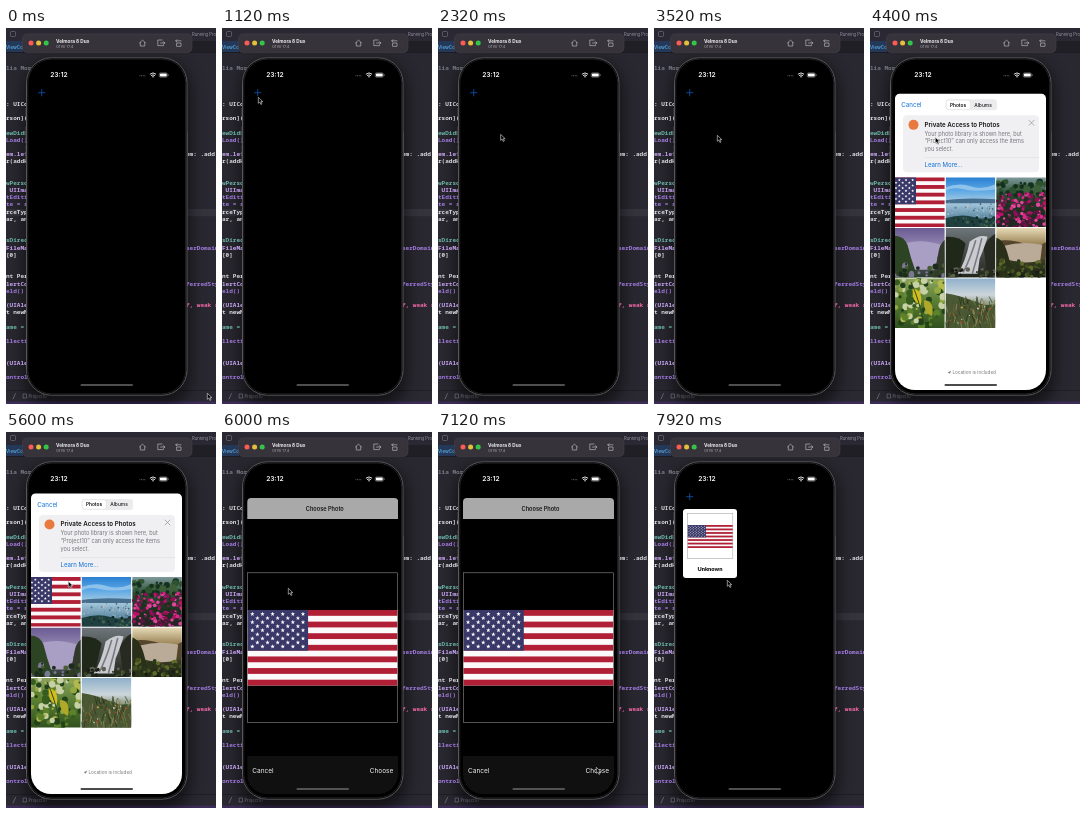
Animation of 210x376 px, one loop 8000 ms. Source, as an HTML page:

```html
<!DOCTYPE html>
<html lang="en">
<head>
<meta charset="utf-8">
<title>Photo picker demo</title>
<style>
html, body { margin: 0; width: 100%; height: 100%; overflow: hidden; background: #24222b; }
svg { display: block; width: 100vw; height: 100vh; }
text { font-family: Inter, Roboto, sans-serif; white-space: pre; }
.code text { font: 600 6px "Noto Sans Mono", "DejaVu Sans Mono", monospace; }
.shadow { filter: blur(8px); opacity: .55; }
</style>
</head>
<body>
<svg id="stage" viewBox="0 0 210 376" xmlns="http://www.w3.org/2000/svg"></svg>
<script>
const LOOP = 8000, STEP = 80;
const stage = document.getElementById('stage');

let seed = 7;
const rnd = (a = 0, b = 1) => {
  seed = (seed * 16807) % 2147483647;
  return a + (b - a) * seed / 2147483647;
};
const pick = list => list[Math.floor(rnd(0, list.length))];
const rect = (x, y, w, h, fill, r = 0, more = '') =>
  `<rect x="${x}" y="${y}" width="${w}" height="${h}" rx="${r}" fill="${fill}" ${more}/>`;
const dot = (x, y, r, fill) => `<circle cx="${x}" cy="${y}" r="${r}" fill="${fill}"/>`;
const path = (d, fill) => `<path d="${d}" fill="${fill}"/>`;
const line = (d, color, w = 0.8) =>
  `<path d="${d}" fill="none" stroke="${color}" stroke-width="${w}" stroke-linecap="round" stroke-linejoin="round"/>`;
const text = (x, y, s, size, fill, weight = 400, anchor = 'start') =>
  `<text x="${x}" y="${y}" font-size="${size}" font-weight="${weight}" fill="${fill}" text-anchor="${anchor}">${s}</text>`;
const group = (id, body, more = '') => `<g id="${id}" ${more}>${body}</g>`;

// ---- editor window ----
const W = '#dcdae0', PINK = '#f267a8', TYPE = '#c9a6f5', FN = '#a27ae0', GREEN = '#6bb5a8', GREY = '#747983';
const leftCode = [
  [42, 'lia Mord', GREY], [78, ': UIColle', W], [92, 'rson]()', W], [107, 'ewDidLoad', GREEN],
  [114, 'Load()', FN], [128, 'em.leftB', TYPE], [135, 'r(addPer', W], [157, 'wPerson', GREEN],
  [164, ' UIImage', TYPE], [171, 'tEditing', FN], [178, 'te = sel', FN], [186, 'rceType', W],
  [193, 'ar, anim', W], [214, 'sDirect', GREEN], [222, 'FileMan', TYPE], [229, '[0]', W],
  [250, 'nt Pers', W], [258, 'lertCon', TYPE], [265, 'eld()', FN], [279, '(UIAlert', TYPE],
  [286, 't newNam', W], [301, 'ame = n', GREEN], [315, 'llection', FN], [337, '(UIAlert', TYPE],
  [351, 'ontroll', FN]
];
const rightCode = [[128, 'em: .add,', W], [222, 'serDomain', FN], [258, 'ferredSty', FN], [279, 'f, weak s', PINK]];

function editor() {
  let s = rect(0, 0, 210, 376, '#292830') + rect(0, 0, 210, 13, '#2a2832') + rect(0, 13, 210, 11, '#201f26')
    + rect(0, 13, 17, 11, '#24385a') + rect(0, 24, 210, 0.6, '#17151c') + rect(0, 181, 210, 7.2, '#35343d');
  s += rect(4.5, 3.5, 5, 5, 'none', 1, 'stroke="#7d7a88" stroke-width=".6"');
  s += text(186, 8, 'Running Project', 4.2, '#9a97a4') + text(0, 20.5, 'ViewCon', 4.6, '#5fb3e6', 500);
  s += rect(0, 362, 210, 11.5, '#2a2831') + rect(0, 362, 210, 0.5, '#17151c') + rect(0, 373.5, 210, 2.5, '#3b2c58');
  s += line('M7 371L9.5 365.500M17.500 366h3v4h-3z', '#8d899b', 0.6) + text(22.5, 370, 'Project10', 4.2, '#9a97a4');
  s += rect(18, 34, 166, 344, '#000', 26, 'class="shadow"');
  const code = leftCode.map(([y, t, c]) => text(0, y, t, 6, c))
    .concat(rightCode.map(([y, t, c]) => text(180, y, t, 6, c))).join('');
  return s + `<g class="code">${code}</g>`;
}

function toolbar() {
  let s = rect(16.5, 6, 169.5, 18.5, '#37333b', 4.5, 'stroke="#48444d" stroke-width=".5"');
  ['#fc5b57', '#e5bf3c', '#35c649'].forEach((c, i) => s += dot(25 + i * 7.6, 15, 2.5, c));
  s += text(50, 15.3, 'Velmora 8 Duo', 4.7, '#f1eff3', 700) + text(50, 20.3, 'Orvo 17.4', 4, '#a5a1a9');
  s += line('M133.500 15L136.500 12L139.500 15M134.300 14.500V18H138.700V14.500', '#c9c6cd', 0.6);
  s += line('M156 12H151.800V17.600H157.500M154.500 15H158.800M157.300 13.500L158.800 15L157.300 16.500', '#c9c6cd', 0.6);
  s += line('M175 12.800H169.800M171 11.600L169.800 12.800L171 14M171 15H175V18.300H171Z', '#c9c6cd', 0.6);
  return s;
}

// ---- pictures ----
function star(x, y, r) {
  let d = '';
  for (let i = 0; i < 10; i++) {
    const a = i * Math.PI / 5, k = i % 2 ? r * 0.4 : r;
    d += (i ? 'L' : 'M') + (x + k * Math.sin(a)).toFixed(2) + ' ' + (y - k * Math.cos(a)).toFixed(2);
  }
  return d + 'Z';
}
function flag(x, y, w, h) {
  const bar = h / 13, cw = w * 0.404, ch = bar * 7;
  let s = rect(x, y, w, h, '#fbf9fa'), d = '';
  for (let i = 0; i < 13; i += 2) s += rect(x, y + i * bar, w, bar, '#b01f36');
  s += rect(x, y, cw, ch, '#393868');
  for (let r = 0; r < 9; r++)
    for (let c = r % 2; c < 11; c += 2) d += star(x + cw * (c + 1) / 12, y + ch * (r + 1) / 10, bar * 0.4);
  return s + path(d, '#fff');
}
const blobs = (n, x0, x1, y0, y1, r0, r1, colors) => {
  let s = '';
  while (n--) s += dot(rnd(x0, x1).toFixed(1), rnd(y0, y1).toFixed(1), rnd(r0, r1).toFixed(1), pick(colors));
  return s;
};
const blades = (n, y0, y1, colors) => {
  let s = '';
  while (n--) {
    const x = rnd(0, 50), y = rnd(y0, y1);
    s += line(`M${x.toFixed(1)} ${y.toFixed(1)}l${rnd(-3, 3).toFixed(1)} ${rnd(-9, -3).toFixed(1)}`, pick(colors), 0.7);
  }
  return s;
};
let defs = '';
const sky = (id, ...colors) => {
  defs += `<linearGradient id="${id}" x2="0" y2="1">` + colors.map((c, i) =>
    `<stop offset="${i / (colors.length - 1)}" stop-color="${c}"/>`).join('') + '</linearGradient>';
  return rect(0, 0, 50, 50, `url(#${id})`);
};
const pictures = [
  () => flag(-19, 0, 99, 50),
  () => sky('p1', '#2a7fd0', '#58a6e6', '#a9cbe0', '#6c96ae', '#3f6f88')
    + path('M0 10Q14 5 25 9T50 7V12Q30 15 18 12T0 14Z', '#8fc2ea')
    + path('M0 23Q20 20 50 22V26H0Z', '#466e8c')
    + blobs(50, 0, 50, 26, 40, 0.4, 1.1, ['#8fb0c0', '#3f6478', '#b4c4c8', '#547f92'])
    + path('M0 41Q16 36 29 40T50 39V50H0Z', '#20403f')
    + blobs(45, 0, 50, 40, 50, 0.5, 1.6, ['#2a4c42', '#142b30', '#47644f']),
  () => sky('p2', '#7e9a9c', '#2b4a30', '#1d3020', '#2a2026')
    + blobs(40, 0, 50, 4, 18, 1, 4, ['#15301e', '#2c5230', '#3c5f38'])
    + blobs(190, 0, 50, 16, 50, 0.7, 2.2, ['#bb0f68', '#d42a88', '#8d1058', '#e0489c', '#1d3020', '#5e1440']),
  () => sky('p3', '#6a5a92', '#8f82ae', '#56566a', '#2a3a28')
    + path('M0 8Q9 8 13 18L18 34L22 50H0Z', '#2d4424')
    + path('M12 15Q28 11 46 17L42 30L44 42H20L16 30Z', '#a99fc4')
    + path('M50 12Q44 16 43 28L38 50H50Z', '#33382c')
    + blobs(34, 0, 50, 36, 50, 1, 3, ['#2e4424', '#1c2c1a', '#495c32', '#7a7890']),
  () => sky('p4', '#6e767c', '#474b46', '#1f261c')
    + path('M0 9Q14 8 20 16L12 50H0Z', '#20281a') + path('M50 6Q42 10 38 20L42 50H50Z', '#262a20')
    + path('M24 14Q34 6 42 9Q38 22 34 31L32 46H12Q20 34 24 14Z', '#c9cbd0')
    + line('M30 13Q25 30 18 44M36 11Q32 28 27 45', '#777c80', 1.6)
    + blobs(30, 0, 50, 40, 50, 0.8, 2.5, ['#3b4a26', '#171c14', '#5c6052']),
  () => sky('p5', '#e6dcb8', '#9b8254', '#3a3a22', '#1a2014')
    + path('M0 13Q16 11 28 16T50 14V30H0Z', '#54452c')
    + path('M8 18Q26 13 46 17L44 33Q28 37 12 32Z', '#b9ab98')
    + path('M0 10Q8 12 12 28L18 50H0Z', '#2a2f1a')
    + blobs(55, 0, 50, 32, 50, 0.8, 2.6, ['#41501f', '#171d12', '#5f6a2a', '#2b371a']),
  () => sky('p6', '#8aa35e', '#557a30', '#30501f')
    + blobs(85, 0, 50, 0, 50, 1, 3.8, ['#5d822a', '#93a83e', '#365c20', '#b3b94e', '#22421a', '#c8d0a8'])
    + path('M18 10Q28 12 26 27Q16 23 18 10Z', '#d2bc1e') + path('M29 22Q40 22 37 38Q28 34 29 22Z', '#b0a828')
    + line('M16 4Q24 20 29 46', '#2c471d', 1),
  () => sky('p7', '#8fb0cc', '#ccd6da', '#5c6a3e', '#2f3a22')
    + path('M0 15Q14 17 28 23T50 25V50H0Z', '#4a5834')
    + blades(130, 24, 53, ['#78803f', '#26361c', '#99946a', '#3d5226', '#5a4630'])
    + blobs(16, 4, 46, 26, 46, 0.5, 1, ['#b8442f', '#c8a83a', '#d0cbb8'])
];

// ---- phone screens ----
const BLUE = '#0f6fd8', NOTE = '#77777c';
function picker() {
  let s = rect(25, 61.5, 151, 330, '#fff', 4.5);
  s += text(31.3, 75, 'Cancel', 6.2, BLUE) + rect(75.5, 67, 51.5, 11, '#ececee', 3);
  s += rect(76.3, 67.8, 24, 9.4, '#fff', 2.4, 'stroke="#d9d9dc" stroke-width=".4"');
  s += text(88, 74.3, 'Photos', 4.8, '#111', 600, 'middle') + text(113, 74.3, 'Albums', 4.9, '#222', 500, 'middle');
  s += rect(33, 83, 136, 57, '#f0f0f2', 4) + dot(43.5, 92.5, 5, '#e8793f');
  s += text(54.5, 94.3, 'Private Access to Photos', 6.25, '#111', 600);
  ['Your photo library is shown here, but', '“Project10” can only access the items', 'you select.']
    .forEach((t, i) => s += text(54.5, 103.3 + i * 7.8, t, 5.6, NOTE));
  s += rect(54.5, 125.2, 114.5, 0.5, '#d8d8da') + text(54.5, 134.5, 'Learn More...', 6.05, BLUE);
  s += line('M159 88L164 93M164 88L159 93', '#929297', 0.7);
  pictures.forEach((draw, i) => {
    const x = 25 + (i % 3) * 50.6, y = 145 + Math.floor(i / 3) * 50.5;
    s += `<g transform="translate(${x} ${y})" clip-path="url(#cell)">${draw()}</g>`;
  });
  s += path('M77.500 340.500L81 338.500L79.800 342L79.300 340.700Z', NOTE);
  return s + text(82.5, 342, 'Location is included', 4.6, NOTE);
}
function cropper() {
  return rect(25, 60.5, 151, 330, '#000', 4.5) + path('M25 87V70Q25 66 29 66H172Q176 66 176 70V87Z', '#a9a9a9')
    + text(102.5, 78.5, 'Choose Photo', 5.6, '#161616', 600, 'middle')
    + flag(25, 178, 150.5, 75.5)
    + rect(25.3, 140.8, 150, 149.7, 'none', 0, 'stroke="#8d8d8d" stroke-width=".6"')
    + rect(25, 324, 151, 60, '#101011')
    + text(30, 341, 'Cancel', 6.5, '#f2f2f2') + text(171, 341, 'Choose', 6.5, '#f2f2f2', 400, 'end');
}
function card() {
  return rect(29, 77, 54, 69, '#fff', 3) + flag(33.5, 93, 45.5, 23)
    + rect(33.4, 81.4, 45.4, 45, 'none', 0, 'stroke="#aaa" stroke-width=".6"')
    + `<text x="56" y="138.500" text-anchor="middle" fill="#111" style="font:900 5.7px Lato,sans-serif">Unknown</text>`;
}
function statusBar() {
  let s = text(44.2, 49.3, '23:12', 6.7, '#fff', 600);
  for (let i = 0; i < 4; i++) s += dot(134 + i * 1.6, 47.8, 0.45, '#aaa');
  s += line('M144.200 46Q147 43.600 149.800 46M145.400 47.400Q147 46 148.600 47.400', '#fff', 0.9) + dot(147, 48.7, 0.7, '#fff');
  s += rect(153.2, 44.9, 8.2, 4.3, 'none', 1.3, 'stroke="#aaa" stroke-width=".5"') + rect(153.9, 45.6, 6.8, 2.9, '#fff', 0.8);
  return s + rect(161.9, 46.3, 0.6, 1.5, '#aaa', 0.3);
}
function phone() {
  let s = '';
  [[80, 8], [98, 15], [117, 15]].forEach(([y, h]) => s += rect(19.3, y, 1.5, h, '#3c3b3f', 0.5));
  s += rect(180.5, 104, 1.5, 24, '#3c3b3f', 0.5);
  s += rect(20.5, 29.8, 160.5, 337.4, '#000', 25, 'stroke="#59575a" stroke-width="1"');
  s += rect(21.8, 31.1, 157.9, 334.8, 'none', 24, 'stroke="#222123" stroke-width="1"');
  const sheet = group('sheet', group('picker', picker()) + group('cropper', cropper()));
  const plus = group('plus', line('M32.500 64.700H38.900M35.700 61.500V67.900', '#1160cc', 0.7));
  s += `<g clip-path="url(#screen)">${plus}${group('card', card())}${sheet}</g>`;
  return s + statusBar() + rect(74.5, 356.2, 52.5, 1.6, '#6c6a68', 0.8, 'id="home"');
}

const body = editor() + phone() + toolbar() + group('cursor',
  '<path d="M.3 .3V6.300L1.800 5L2.900 7.400L4 6.900L2.900 4.600H4.800Z" fill="#000" stroke="#e4e4e4" stroke-width=".6" stroke-linejoin="round"/>');
stage.innerHTML = `<defs>${defs}<clipPath id="screen">${rect(25, 34, 151, 328, '#000', 20)}</clipPath>`
  + `<clipPath id="cell">${rect(0, 0, 49.6, 49.6, '#000')}</clipPath></defs>${body}`;

// ---- motion ----
const el = id => document.getElementById(id);
const [sheet, list, crop, cell, plus, home, cursor] =
  ['sheet', 'picker', 'cropper', 'card', 'plus', 'home', 'cursor'].map(el);
const OPEN = 4060, PUSH = 5610, CLOSE = 7200;
const trail = [
  [0, 201, 365], [160, 201, 365], [880, 36, 69], [1520, 36, 69], [2400, 63, 107], [3520, 63, 107],
  [4400, 65, 109], [4800, 65, 109], [5360, 62, 149], [5640, 62, 149], [6000, 66, 156],
  [6160, 68, 162], [6800, 158, 335], [7200, 158, 335], [7800, 73, 148], [8000, 73, 148]
];
// Remaining distance of a critically damped spring
const spring = (ms, w) => ms <= 0 ? 1 : (1 + w * ms / 1000) * Math.exp(-w * ms / 1000);
const move = (node, x, y) => node.setAttribute('transform', `translate(${x.toFixed(2)} ${y.toFixed(2)})`);
const show = (node, on) => node.setAttribute('visibility', on ? 'visible' : 'hidden');

function pointer(t) {
  const i = Math.max(1, trail.findIndex(k => k[0] > t));
  const [t0, x0, y0] = trail[i - 1], [t1, x1, y1] = trail[i];
  const p = (t - t0) / (t1 - t0), e = p * p * (3 - 2 * p);
  return [x0 + (x1 - x0) * e, y0 + (y1 - y0) * e];
}
function draw(t) {
  const drop = t < CLOSE ? spring(t - OPEN, 18.3) : 1 - spring(t - CLOSE, 18.3);
  const side = spring(t - PUSH, 22);
  move(sheet, 0, drop * 303);
  move(list, -45 * (1 - side), 0);
  move(crop, side * 152, 0);
  show(sheet, t > OPEN && t < CLOSE + 560);
  show(list, t > OPEN && t < PUSH + 360);
  show(crop, t > PUSH && t < CLOSE + 560);
  show(cell, t >= CLOSE);
  plus.setAttribute('opacity', drop.toFixed(3));
  home.setAttribute('fill', t > OPEN + 80 && t < PUSH + 150 ? '#111' : '#6c6a68');
  move(cursor, ...pointer(t));
}
const start = performance.now();
function tick(now) {
  const t = Math.max(0, now - start) % LOOP;
  draw(Math.floor(t / STEP) * STEP);
  requestAnimationFrame(tick);
}
draw(0);
requestAnimationFrame(tick);
</script>
</body>
</html>
```
